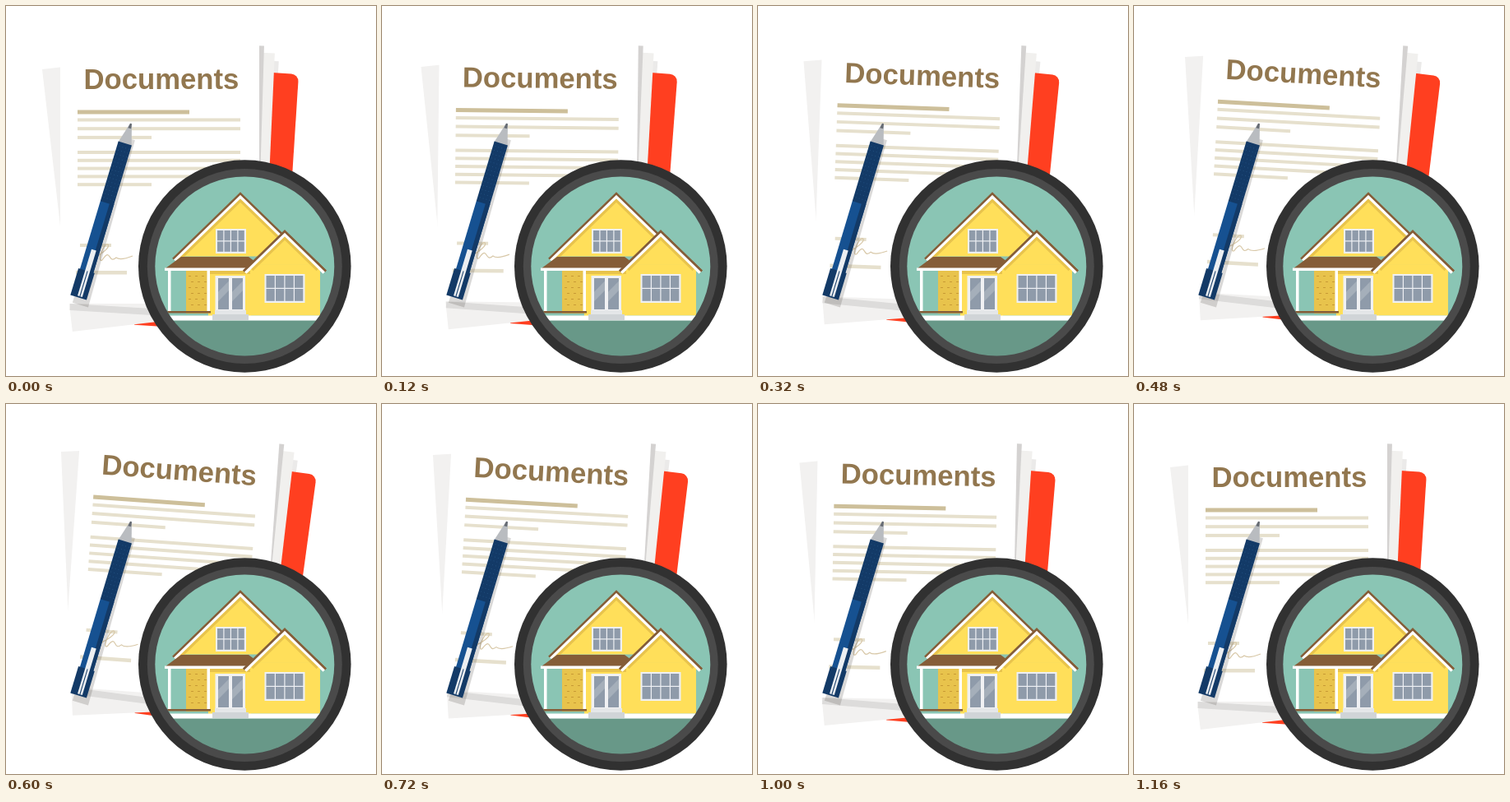
Recreate the animation shown at these times as an HTML page with a canvas. Size 450 by 450 pixels, loop 1200 ms.

```html
<!DOCTYPE html>
<html lang="en">
<head>
<meta charset="utf-8">
<title>Documents</title>
<style>
  html, body { margin: 0; width: 100%; height: 100%; overflow: hidden; background: #fff; }
  canvas { display: block; width: 450px; height: 450px; }
</style>
</head>
<body>
<canvas id="stage" width="450" height="450"></canvas>
<script>
const ctx = document.getElementById('stage').getContext('2d');
const LOOP = 1200, STEP = 40, PEAK = 15, LAST = 29;
const MAX_TILT = 0.0715;
const PITCH = 0.97;
const WHITE = '#fff', WALL = '#ffdf5a', SHADE = '#e8c34c', BROWN = '#855d38';
const GLASS = '#8f9baa', TEXT_LINE = '#e6e0cd', NAVY = '#133a67', BLUE = '#165191';

function rect(color, x, y, w, h) {
  ctx.fillStyle = color;
  ctx.fillRect(x, y, w, h);
}

function disc(color, x, y, r) {
  ctx.fillStyle = color;
  ctx.beginPath();
  ctx.arc(x, y, r, 0, Math.PI * 2);
  ctx.fill();
}

function turned(x, y, angle, draw) {
  ctx.save();
  ctx.translate(x, y);
  ctx.rotate(angle);
  draw();
  ctx.restore();
}

function sheet(color, x, y, w, h, lean) {
  turned(x, y, lean, () => rect(color, 0, 0, w, h));
}

// Symmetric trapezoid, hanging from the middle of its top edge.
function taper(color, x, y, top, bottom, h) {
  ctx.fillStyle = color;
  ctx.beginPath();
  ctx.moveTo(x - top, y);
  ctx.lineTo(x + top, y);
  ctx.lineTo(x + bottom, y + h);
  ctx.lineTo(x - bottom, y + h);
  ctx.fill();
}

// Linear swing out and back, held for each 40 ms step.
function tilt(ms) {
  const i = Math.floor((ms % LOOP) / STEP);
  const k = i <= PEAK ? (i - 0.8) / (PEAK - 0.8) : (LAST - i) / (LAST - PEAK);
  return MAX_TILT * Math.max(0, k);
}

function folder() {
  turned(356, 83, 0.064, () => {
    ctx.fillStyle = '#ff3f20';
    ctx.beginPath();
    ctx.roundRect(-180, 0, 180, 317, [0, 9, 0, 0]);
    ctx.fill();
  });
}

function sheets() {
  sheet('#ebeae9', 212, 60, 120, 300, 0.06);
  folder();
  sheet('#f1f0ee', 207, 52, 120, 320, 0.045);
  sheet('#d4d2d1', 194, 45, 120, 315, 0.03);
  sheet('#f2f1f0', 44, 77, 240, 321, -0.115);
  sheet('#dddcdb', 78, 362, 120, 8, 0.06);
  rect(WHITE, 66, 40, 242, 322);
}

function writing() {
  ctx.fillStyle = '#92774f';
  ctx.font = 'bold 34.7px "Liberation Sans", Arial, sans-serif';
  ctx.fillText('Documents', 94.5, 101);

  const block = (y, gap, rows) => {
    for (let i = 0; i < rows; i++)
      rect(TEXT_LINE, 87, y + i * gap, i < rows - 1 ? 198 : 90, 4);
  };
  rect('#cdbf9a', 87, 126.5, 136, 5);
  block(136.5, 10.7, 3);
  block(176, 9.8, 5);
  rect(TEXT_LINE, 90, 289, 38, 4);
  rect(TEXT_LINE, 85, 322, 62, 4.5);

  ctx.strokeStyle = '#d8c8a8';
  ctx.lineWidth = 1.2;
  ctx.beginPath();
  ctx.moveTo(96, 312);
  ctx.bezierCurveTo(108, 307, 128, 295, 124, 290);
  ctx.bezierCurveTo(119, 287, 110, 313, 117, 309);
  ctx.bezierCurveTo(128, 292, 124, 315, 134, 306);
  ctx.quadraticCurveTo(139, 310, 154, 304);
  ctx.stroke();
}

function papers(angle) {
  turned(321, 389, angle, () => {
    ctx.translate(-321, -389);
    sheets();
    writing();
  });
}

function pen() {
  turned(154, 152, 0.292, () => taper('rgba(70,65,60,.2)', 0, 10, 6, 10, 211));
  turned(152, 143, 0.292, () => {
    taper('#b9bcc0', 0, 0, 1, 8.5, 26);
    taper('#666b72', 0, 0, 1, 2, 6);
    rect(BLUE, -8.5, 100, 17, 90);
    rect(NAVY, 3, 100, 5.5, 90);
    rect(NAVY, -8.5, 25, 17, 76);
    for (let y = 30; y < 98; y += 5)
      for (let x = -6; x < 8; x += 4) rect('#22507f', x, y, 1, 1);
    rect(NAVY, -10.5, 187, 20.5, 34);
    rect('#eceff2', -2, 160, 6, 59);
    rect(NAVY, 0.5, 187, 1, 32);
  });
}

function panes(x, y, w, h, cols, rows) {
  rect('#eef0f4', x, y, w, h);
  const cw = (w - 3) / cols, rh = (h - 3) / rows;
  for (let c = 0; c < cols; c++)
    for (let r = 0; r < rows; r++)
      rect(GLASS, x + 2 + c * cw, y + 2 + r * rh, cw - 1.2, rh - 1.2);
}

function gable(x, y, half, wallHalf) {
  taper(WALL, x, y, 0, wallHalf, wallHalf * PITCH);
  const chevron = (color, drop, width, reach) => {
    ctx.strokeStyle = color;
    ctx.lineWidth = width;
    ctx.beginPath();
    for (const side of [-1, 0, 1])
      ctx.lineTo(x + side * reach, y + drop + Math.abs(side) * reach * PITCH);
    ctx.stroke();
  };
  chevron(SHADE, 9, 4, wallHalf - 3);
  chevron(WHITE, 4.5, 4, half - 2);
  chevron(BROWN, 1, 2.5, half);
}

function porch() {
  rect(SHADE, 219, 320, 27, 54);
  for (let y = 328; y < 368; y += 7)
    for (let x = 222; x < 243; x += 8) rect('#c89a35', x + (y % 2) * 3, y, 3, 1);
  rect(WALL, 246, 320, 52, 58);
  rect(SHADE, 246, 322, 51, 4);
  taper(BROWN, 254, 305, 41, 60, 14);
  rect(WHITE, 193, 318.5, 106, 3.5);
  for (const x of [197, 244.5]) rect(WHITE, x, 322, 3.5, 50);
  rect(BROWN, 196, 371, 53, 2.5);
}

function door() {
  rect('#f0f1f3', 254.5, 328, 36.5, 44);
  for (const x of [258, 275]) {
    rect(GLASS, x, 331, 13, 38);
    ctx.save();
    ctx.beginPath();
    ctx.rect(x, 331, 13, 38);
    ctx.clip();
    sheet('#a5afba', x - 6, 354, 34, 8, -0.8);
    ctx.restore();
  }
}

function house() {
  gable(285, 227, 82, 80);
  panes(255, 271, 37, 30, 4, 2);
  porch();
  door();
  gable(339, 273, 50, 43);
  rect(WALL, 297, 314.5, 85, 62);
  gable(339, 273, 50, 43);
  panes(314.5, 326, 49, 35, 4, 2);
  rect(WHITE, 196, 376.5, 186, 6);
  rect('#e4e6e8', 254, 370, 38, 5);
  rect('#d0d4d7', 251, 375, 44, 7);
}

function magnifier(x, y) {
  disc('#313131', x, y, 129.3);
  disc('#4a4a4a', x, y, 118.5);
  ctx.save();
  ctx.beginPath();
  ctx.arc(x, y, 109, 0, Math.PI * 2);
  ctx.clip();
  rect('#8ac5b4', 180, 200, 230, 183);
  rect('#689888', 180, 382.3, 230, 50);
  house();
  ctx.restore();
}

function frame() {
  rect(WHITE, 0, 0, 450, 450);
  papers(tilt(performance.now()));
  pen();
  magnifier(290.3, 316.5);
  requestAnimationFrame(frame);
}

frame();
</script>
</body>
</html>
```
